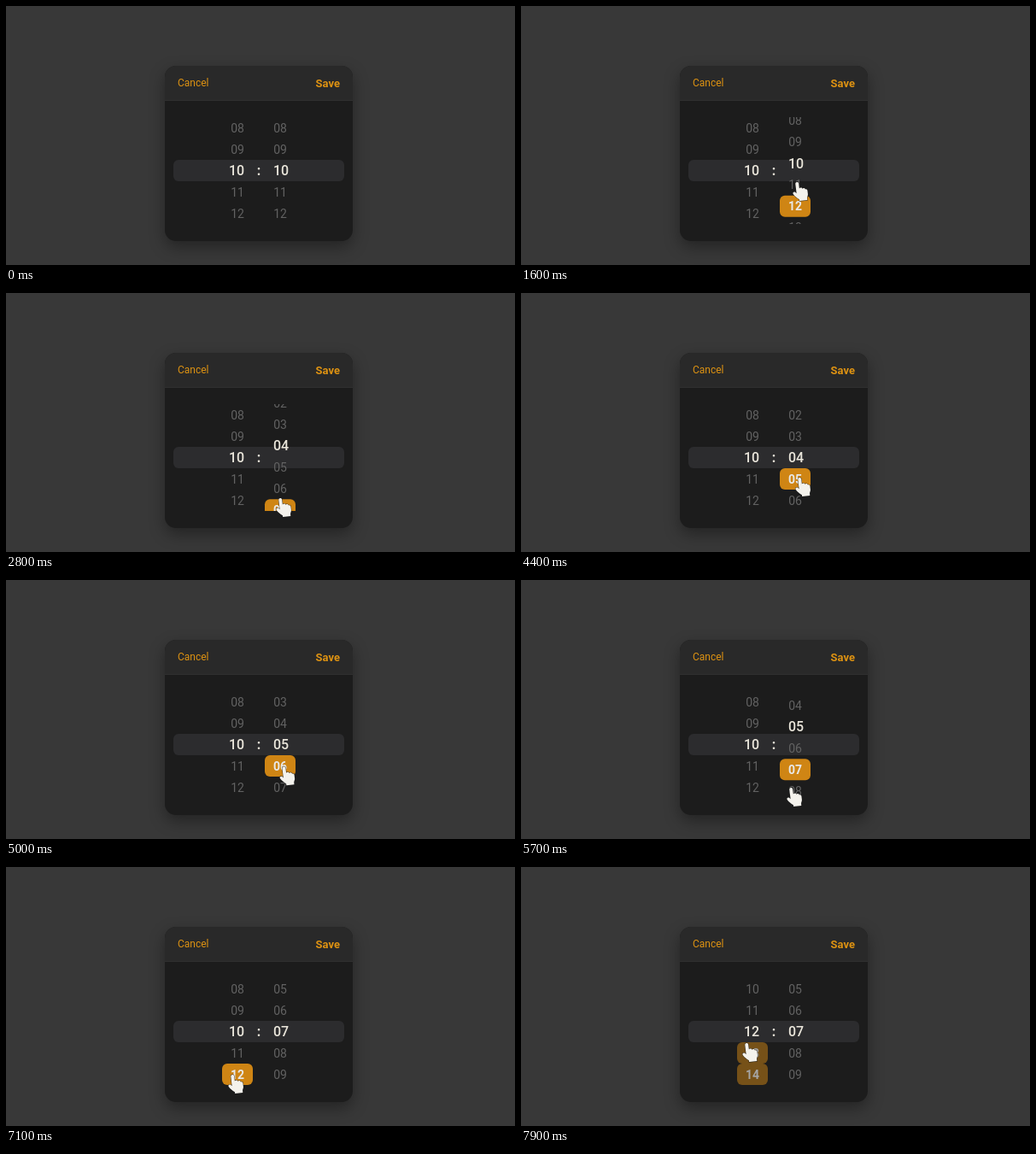
Write an HTML page with a canvas that moves like this. It is 596 by 303 pixels and loops after 8 s.

```html
<!DOCTYPE html>
<html lang="en">
<head>
<meta charset="utf-8">
<title>Time picker</title>
<style>
  html, body { margin: 0; width: 100%; height: 100%; overflow: hidden; background: #383838; }
  canvas { display: block; }
</style>
</head>
<body>
<canvas id="stage" width="596" height="303"></canvas>
<script>
const ctx = document.getElementById('stage').getContext('2d');
const LOOP = 8000, ROW = 25, MID = 192.5, VISIBLE = 62.5;
const HOVER_LAG = 100, FADE = 60, SAMPLES = 6;
const ORANGE = '#dd9212', LIGHT = '#e9e5da';

// Each scroll: when it starts and the value it settles on
const hours = { x: 271, activeX: 270, first: 10, scrolls: [{ at: 7108, to: 12 }] };
const minutes = { x: 321, activeX: 322, first: 10, scrolls: [
  { at: 1568, to: 12 }, { at: 2230, to: 4 }, { at: 4408, to: 5 }, { at: 5608, to: 7 }
] };

const pointerStart = { x: 312, y: 312 };
const pointerMoves = [
  { at: 500, length: 450, x: 322, y: 243 },
  { at: 1510, length: 80, x: 323, y: 206 },
  { at: 2200, length: 400, x: 321, y: 240 },
  { at: 3330, length: 370, x: 326, y: 216 },
  { at: 4900, length: 580, x: 316, y: 243 },
  { at: 6100, length: 500, x: 265, y: 243 },
  { at: 7690, length: 200, x: 264, y: 206 }
];

const clamp = v => Math.min(1, Math.max(0, v));
const mix = (a, b, k) => a + (b - a) * k;
const smooth = k => k * k * (3 - 2 * k);
const easeOut = k => 1 - (1 - k) ** 3;

// Longer scrolls take longer
function position(column, t) {
  let value = column.first;
  for (const { at, to } of column.scrolls) {
    const length = 440 + 66 * Math.abs(to - value);
    value = mix(value, to, easeOut(clamp((t - at) / length)));
  }
  return value;
}

function pointer(t) {
  let { x, y } = pointerStart;
  for (const move of pointerMoves) {
    const k = smooth(clamp((t - move.at) / move.length));
    x = mix(x, move.x, k);
    y = mix(y, move.y, k);
  }
  return { x, y };
}

function hoveredValue(column, t) {
  const { x, y } = pointer(t);
  if (Math.abs(x - column.x) > 18 || Math.abs(y - MID) > VISIBLE) return null;
  return Math.round(position(column, t) + (y - MID) / ROW);
}

// Share of a short, delayed time window in which the pointer was over the item
function hoverAmount(column, value, t) {
  let hits = 0;
  for (let i = 0; i < SAMPLES; i++) {
    const past = t - HOVER_LAG - FADE * i / (SAMPLES - 1);
    if (hoveredValue(column, past) === value) hits++;
  }
  return hits / SAMPLES;
}

function box(x, y, w, h, r, fill) {
  ctx.fillStyle = fill;
  ctx.beginPath();
  ctx.roundRect(x, y, w, h, r);
  ctx.fill();
}

function text(str, x, y, size, weight, fill, align = 'center') {
  ctx.font = `${weight} ${size}px Roboto, sans-serif`;
  ctx.textAlign = align;
  ctx.fillStyle = fill;
  ctx.fillText(str, x, y);
}

function drawPanel() {
  ctx.fillStyle = '#383838';
  ctx.fillRect(0, 0, 596, 303);
  ctx.save();
  ctx.shadowColor = 'rgba(0,0,0,.36)';
  ctx.shadowBlur = 18;
  ctx.shadowOffsetY = 7;
  box(186, 70, 220, 205, 13, '#1c1c1c');
  ctx.restore();
  box(186, 70, 220, 40, [13, 13, 0, 0], '#292929');
  ctx.fillStyle = '#2f2f2f';
  ctx.fillRect(186, 110, 220, 1);
  text('Cancel', 201, 93.5, 12, 400, ORANGE, 'left');
  text('Save', 391, 94.5, 13, 700, ORANGE, 'right');
  box(196, 180, 200, 25, 6, '#2c2c2e');
  text(':', 296, 198, 16, 700, LIGHT);
}

function drawColumn(column, t) {
  const pos = position(column, t), active = Math.floor(pos + 0.02);
  for (let n = active - 3; n <= active + 4; n++) {
    const y = MID + (n - pos) * ROW;
    const hover = hoverAmount(column, n, t);
    const label = String(n).padStart(2, '0');
    if (hover) box(column.x - 18, y - 12.5, 36, ROW, 6, `rgba(207,133,20,${hover})`);
    if (n === active) {
      text(label, column.activeX, y + 5.5, 16, 500, LIGHT);
    } else {
      const shade = mix(98, 232, hover);
      text(label, column.x, y + 5, 14, hover > 0.4 ? 700 : 400, `rgb(${shade},${shade},${shade})`);
    }
  }
}

const hand = new Path2D(
  'M-2 2C-2-.6 2-.6 2 2V8C3 6.7 5.5 7 5.7 8.8C7 7.7 8.9 8.3 9 10' +
  'C10.3 9.3 11.6 10.2 11.5 12V16C11.5 18 10 19 10 21V23H.5V21' +
  'C-2 19-4.5 16.5-6 14C-7.2 11.8-4.6 10.5-3.2 12L-2 13.5Z'
);

function drawPointer(t) {
  const { x, y } = pointer(t);
  ctx.save();
  ctx.translate(x, y);
  ctx.rotate(-0.12);
  ctx.scale(0.97, 0.97);
  ctx.strokeStyle = 'rgba(25,25,25,.8)';
  ctx.stroke(hand);
  ctx.fillStyle = '#f4f2ec';
  ctx.fill(hand);
  ctx.restore();
}

function draw() {
  const t = performance.now() % LOOP;
  drawPanel();
  ctx.save();
  ctx.beginPath();
  ctx.rect(196, MID - VISIBLE, 200, VISIBLE * 2);
  ctx.clip();
  drawColumn(hours, t);
  drawColumn(minutes, t);
  ctx.restore();
  drawPointer(t);
  requestAnimationFrame(draw);
}
draw();
</script>
</body>
</html>
```
